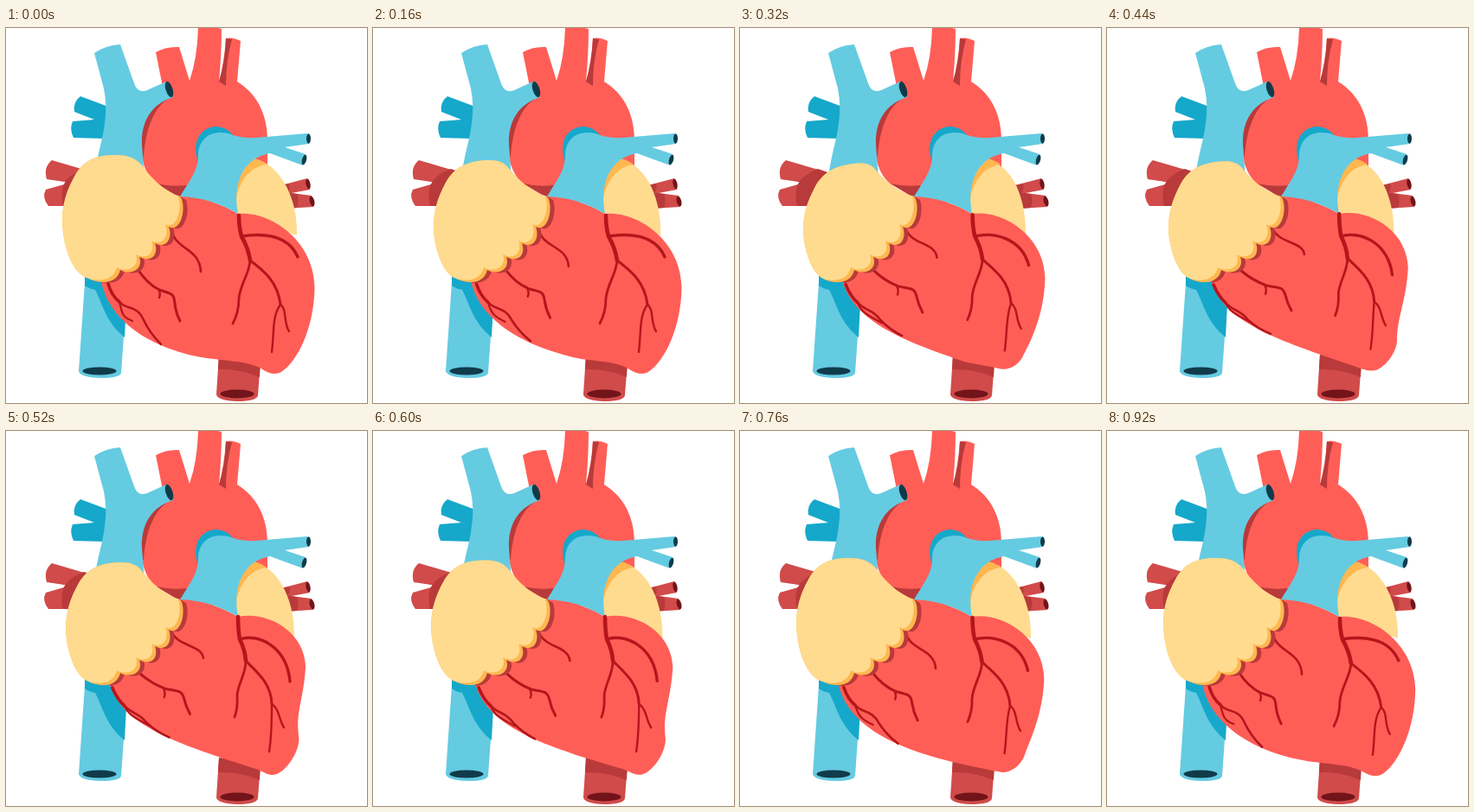
An HTML page for the animation above (0.96 s loop, 417 px wide and 434 px high).

```html
<!DOCTYPE html>
<html lang="en">
<head>
<meta charset="utf-8">
<title>Beating heart</title>
<style>
  html, body { margin: 0; width: 100%; height: 100%; overflow: hidden; background: #fff; }
  svg { display: block; width: 417px; height: 434px; }
  .red { fill: #ff5e57 } .mid { fill: #d04b4a } .dark { fill: #b93a3a } .hole { fill: #73131a }
  .blue { fill: #65cbe1 } .deep { fill: #15a8ca } .navy { fill: #103b4a }
  .yellow { fill: #ffdb8f } .orange { fill: #ffb750 }
  #veins path { fill: none; stroke: #b5161b; stroke-linecap: round; stroke-linejoin: round; }
</style>
</head>
<body>
<svg viewBox="0 0 417 434">
  <clipPath id="clip"><path id="clipShape"/></clipPath>

  <!-- pulmonary veins, left and right -->
  <path class="mid" d="M53 153L104 168L84 206L49 206Q41 196 46 187L74 179L47 175Q43 161 53 153Z"/>
  <path class="dark" d="M104 168L90 163Q70 171 66 183Q63 195 66 206L90 206Z"/>
  <path class="mid" d="M318 182L348 174L351 187L330 191L353 194L355 207L322 209Z"/>
  <path class="dark" d="M318 182L327 180Q329 186 325 191L336 192Q339 200 336 208L322 209Z"/>
  <ellipse class="hole" cx="349" cy="180.500" rx="2.500" ry="6" transform="rotate(-12 349 180.500)"/>
  <ellipse class="hole" cx="353.500" cy="200.500" rx="2.700" ry="6" transform="rotate(-14 353.500 200.500)"/>

  <!-- lower vessel -->
  <path class="mid" d="M246 378L294 385L291 425Q290 432 267 432Q244 431 243 424Z"/>
  <path class="dark" d="M246 378L294 385L293 404Q270 394 245 395Z"/>
  <ellipse class="hole" cx="267" cy="423.500" rx="19.500" ry="5"/>

  <!-- vena cava branches -->
  <path class="deep" d="M86 79L118 91L114 128L78 127Q73 117 77 108L102 106L79 97Q77 86 86 79Z"/>

  <!-- aorta -->
  <path class="red" d="M173 28Q185 21 200 22L212 61Q221 35 222 0Q235 -3 249 1Q249 30 246 62Q252 40 254 12Q262 10 271 15L267 62C290 76 302 100 302 130L302 170L262 205L200 196L178 183C163 175 155 155 156 130Q160 95 183 78Z"/>
  <path class="dark" d="M254 12L261 13Q254 38 254 67L246 62Q253 40 254 12Z"/>
  <path class="dark" d="M190 80C172 90 161 115 159 150L155 140L155 100L178 78Z"/>
  <path class="dark" d="M174 180Q190 184 209 182L202 197Z"/>

  <!-- vena cava -->
  <path class="blue" d="M102 29Q115 20 132 19L148 64Q152 76 163 72L185 62Q191 65 193 80C168 88 156 108 157 135L160 175L102 175C104 150 112 130 114 110Q117 90 113 70Z"/>
  <ellipse class="navy" cx="188.500" cy="71" rx="4" ry="9.500" transform="rotate(-18 188.500 71)"/>
  <path class="blue" d="M92 280L140 300L133 399Q132 405 109 405Q85 404 84 397Z"/>
  <path class="deep" d="M91 285L140 300L137 358C115 340 112 320 103 303Q96 302 91 298Z"/>
  <ellipse class="navy" cx="108" cy="397" rx="19.500" ry="4.500"/>

  <!-- right auricle -->
  <path id="auricle" class="yellow"/>
  <path class="orange" d="M266 196C264 170 273 153 285 151Q293 152 301 158C285 160 272 172 266 196Z"/>

  <path id="ventricle" class="red"/>

  <!-- pulmonary artery -->
  <path class="deep" d="M222 155C214 132 224 115 243 114Q256 115 262 124L240 140Z"/>
  <path class="blue" d="M201 195C214 174 222 164 222 147C223 126 238 118 257 122Q270 128 288 127L348 122Q353 127 350 134L322 138L346 146Q347 154 343 159L305 145C275 150 261 178 268 215Q236 196 201 195Z"/>
  <ellipse class="navy" cx="349.500" cy="128" rx="2.500" ry="5.800"/>
  <ellipse class="navy" cx="344.500" cy="152.500" rx="2.500" ry="6" transform="rotate(15 344.500 152.500)"/>

  <g id="veins"></g>

  <!-- left atrium -->
  <g clip-path="url(#clip)"><path id="shade" class="dark"/></g>
  <path id="rim" class="orange"/>
  <path id="atrium" class="yellow"/>
</svg>
<script>
const LOOP = 960;
const $ = id => document.getElementById(id);
const draw = (id, d) => $(id).setAttribute('d', d);

// Blend two path strings that share the same commands.
function mix(a, b, k) {
  const target = b.match(/-?[\d.]+/g);
  let i = 0;
  return a.replace(/-?[\d.]+/g, n => (+n + (target[i++] - n) * k).toFixed(2));
}

const smooth = (from, to, t) => {
  const u = Math.min(1, Math.max(0, (t - from) / (to - from)));
  return u * u * (3 - 2 * u);
};
const pulse = (t, start, peak, release, end) => smooth(start, peak, t) - smooth(release, end, t);

// Relaxed and contracted poses.
const auricle = [
  'M267 216C262 180 270 153 285 151C312 155 337 190 336 240Z',
  'M267 216C262 180 270 154 283 152C309 156 330 186 330 240Z'
];
const rightWall = [
  'C305 211 356 246 356.5 300C356 345 338 385 318 398C309 403 300 398 293 393C278 386 262 386 240 383',
  'C300 208 344 230 346 272C344 310 334 325 338.500 355C339 372 324 393 313 397C306 400 300 396 292 392C278 385 262 382 245 377'
];
const leftWall = [
  'C190 378 118 350 109 288L201 195Z',
  'C200 362 130 340 119 288L201 195Z'
];
const atriumWall = [
  'C188 191 174 181 160 163C152 151 142 147 126 147C104 147 89 153 79 172C67 193 63 214 66 237C69 260 78 283 93 289',
  'C188 192 172 182 158 166C152 157 144 156 134 157C112 159 98 166 88 182C77 203 72 218 73.5 241C76 262 84 284 96 290'
];

const veins = [
  // [side, width, relaxed, contracted]
  ['left', 2.6, 'M191 230C192 257 224 253 225 282', 'M191 230C196 250 226 246 228 262'],
  ['left', 3, 'M152 279Q163 296 177 303C191 308 194 306 195 319Q196 329 201 339', 'M155 281Q168 292 184 298C199 301 203 299 206 309Q208 318 213 327'],
  ['left', 2.4, 'M176 302Q179 307 177 312', 'M182 297Q185 303 183 308'],
  ['left', 3.6, 'M118 296Q122 310 131 317', 'M123 297Q129 311 137 318'],
  ['left', 2.6, 'M131 317C140 327 151 320 159 338Q166 353 179 366', 'M137 318C146 328 154 326 163 338Q174 348 189 354'],
  ['left', 2.2, 'M131 317C134 331 135 335 146 339', 'M137 318C142 330 153 333 168 342'],
  ['right', 4.6, 'M269 217Q269 230 272 241Q280 255 282 269', 'M268 215Q268 230 270 241Q276 253 277 266'],
  ['right', 2.8, 'M282 269C281 285 271 295 269 313Q269 329 262 342', 'M277 266C277 282 268 292 267 306Q268 320 264 331'],
  ['right', 3.4, 'M272 241C292 238 325 237 337 265', 'M270 241C290 234 324 248 328 290'],
  ['right', 3, 'M282 269C298 281 314 294 317 320', 'M277 266C291 280 306 292 307 316'],
  ['right', 2.4, 'M317 320C307 334 310 352 307 375', 'M307 316C307 334 307 352 304 371'],
  ['right', 2.4, 'M317 320C325 326 320 340 327 351', 'M307 316C316 322 315 334 321 343']
].map(([side, width, relaxed, tight]) => {
  const path = document.createElementNS('http://www.w3.org/2000/svg', 'path');
  path.setAttribute('stroke-width', width);
  $('veins').append(path);
  return { side, relaxed, tight, path };
});

// Scalloped lower edge of the atrium, shifted to give rim and shadow.
const scallops = [[130, 279], [152, 264], [170, 248], [186, 229], [201, 197]];
function atriumPath(wall, dx, dy) {
  let d = 'M201 195' + wall;
  d += `C${104 + dx} ${295 + dy} ${126 + dx} ${297 + dy} ${130 + dx} ${279 + dy}`;
  for (let i = 1; i < scallops.length; i++) {
    const [x0, y0] = scallops[i - 1], [x, y] = scallops[i];
    d += `C${x0 + 13 + dx} ${y0 + 7 + dy} ${x + 5 + dx} ${y + 14 + dy} ${x + dx} ${y + dy}`;
  }
  return d + 'Z';
}

function render(now) {
  const t = now % LOOP;
  const atria = pulse(t, 0, 280, 280, 760);
  const left = pulse(t, 0, 440, 460, LOOP);
  const right = pulse(t, 160, 540, 560, LOOP);

  draw('auricle', mix(...auricle, atria));
  const body = 'M201 195Q236 196 268 215' + mix(...rightWall, right) + mix(...leftWall, left);
  draw('ventricle', body);
  draw('clipShape', body);
  for (const v of veins)
    v.path.setAttribute('d', mix(v.relaxed, v.tight, v.side === 'left' ? left : right));

  const wall = mix(...atriumWall, atria);
  draw('shade', atriumPath(wall, 7, 2));
  draw('rim', atriumPath(wall, 2, 1));
  draw('atrium', atriumPath(wall, -2, -2));
  requestAnimationFrame(render);
}
render(performance.now());
</script>
</body>
</html>
```
